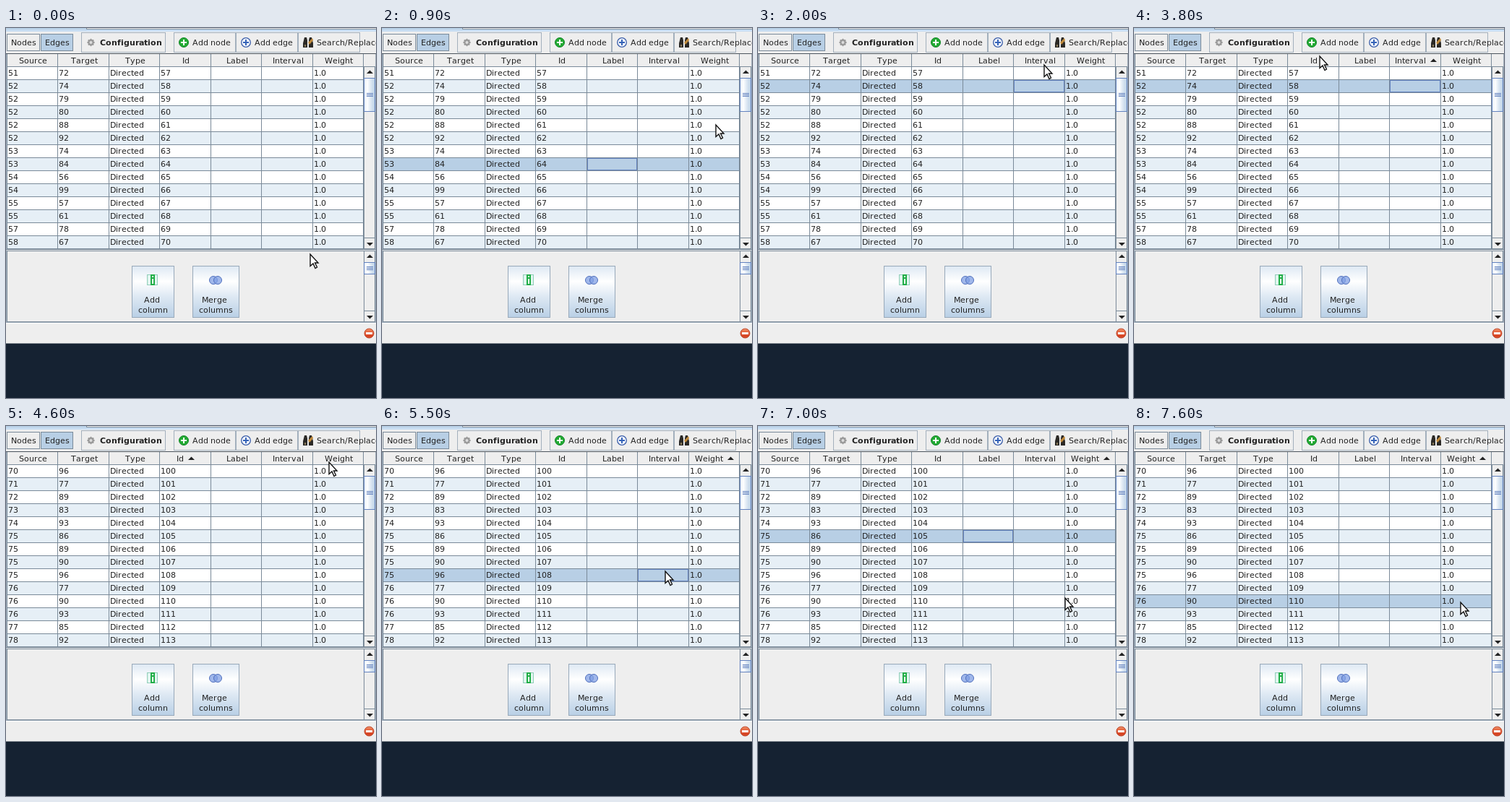
Write an HTML page with a canvas that moves like this. It is 512 px wide and 512 px high and loops after 8000 ms.

```html
<!DOCTYPE html>
<html lang="en">
<head>
<meta charset="utf-8">
<title>Edge table</title>
<style>
  html, body { margin: 0; width: 100%; height: 100%; overflow: hidden; background: #152232; }
  canvas { display: block; }
</style>
</head>
<body>
<canvas id="stage" width="512" height="512"></canvas>
<script>
const ctx = document.getElementById('stage').getContext('2d', { alpha: false });
const LOOP = 8000, STEP = 100;
const PANEL = '#eeeeee', EDGE = '#7a8a99', SOFT = '#a3b0bd', PICK = '#b8cfe5', BLUE = '#6382bf', INK = '#222222';
const FONT = '11px "DejaVu Sans", sans-serif';

const HEADS = ['Source', 'Target', 'Type', 'Id', 'Label', 'Interval', 'Weight'];
const ID = 3, WEIGHT = 6;
const ROW_TOP = 53, ROW_H = 18;
const colX = i => Math.round(1 + i * 70.43);

// Edges listed as source:targets, with ids counting up
function edges(list, id) {
  return list.split(' ').flatMap(group => {
    const [from, targets] = group.split(':');
    return targets.split(',').map(to => [from, to, 'Directed', String(id++), '', '', '1.0']);
  });
}
const unsorted = edges('51:72 52:74,79,80,88,92 53:74,84 54:56,99 55:57,61 57:78 58:67', 57);
const sortedById = edges('70:96 71:77 72:89 73:83 74:93 75:86,89,90,96 76:77,90,93 77:85 78:92', 100);

// Pointer moves: when, for how long, to where, and when it then clicks
const START = { x: 421, y: 313 };
const MOVES = [
  { at: 0, span: 300, x: 328, y: 193, click: 500 },
  { at: 500, span: 400, x: 462, y: 134, click: 1000 },
  { at: 1100, span: 500, x: 400, y: 82, click: 1600 },
  { at: 1600, span: 400, x: 396, y: 51 },
  { at: 2000, span: 300, x: 398, y: 46, click: 2300 },
  { at: 2800, span: 200, x: 447, y: 46 },
  { at: 3100, span: 700, x: 257, y: 39, click: 4000 },
  { at: 4100, span: 500, x: 447, y: 50, click: 5000 },
  { at: 5000, span: 400, x: 392, y: 201, click: 5500 },
  { at: 5600, span: 400, x: 304, y: 144, click: 6200 },
  { at: 6400, span: 400, x: 425, y: 238 },
  { at: 7100, span: 200, x: 442, y: 257 },
  { at: 7300, span: 200, x: 452, y: 244, click: 7600 }
];

// A click on the header sorts; a click below it selects a cell.
function stateAt(t) {
  const s = { ...START, rows: unsorted, sort: -1, row: -1, col: -1 };
  for (const m of MOVES) {
    const k = Math.min(1, Math.max(0, (t - m.at) / m.span));
    s.x = Math.round(s.x + (m.x - s.x) * k);
    s.y = Math.round(s.y + (m.y - s.y) * k);
    if (!(t >= m.click)) continue;
    const col = HEADS.findIndex((_, i) => m.x < colX(i + 1));
    if (m.y >= ROW_TOP) {
      s.row = Math.floor((m.y - ROW_TOP) / ROW_H);
      s.col = col;
    } else {
      s.sort = col;
      if (col === ID) Object.assign(s, { rows: sortedById, row: -1 });
    }
  }
  return s;
}

function rect(x, y, w, h, fill) {
  ctx.fillStyle = fill;
  ctx.fillRect(x, y, w, h);
}

function frame(x, y, w, h, color, fill) {
  if (fill) rect(x, y, w, h, fill);
  ctx.strokeStyle = color;
  ctx.lineWidth = 1;
  ctx.strokeRect(x + 0.5, y + 0.5, w - 1, h - 1);
}

// Letters advance by whole pixels, as in a hinted desktop interface.
const advance = c => Math.round(ctx.measureText(c).width);

function text(s, x, y, font = FONT) {
  ctx.font = font;
  ctx.fillStyle = INK;
  for (const c of s) {
    ctx.fillText(c, x, y);
    x += advance(c);
  }
}

function centered(s, cx, y) {
  ctx.font = FONT;
  const w = [...s].reduce((sum, c) => sum + advance(c), 0);
  text(s, Math.floor(cx - w / 2), y);
  return w;
}

function paint(fill, stroke, width = 1) {
  ctx.fillStyle = fill;
  ctx.fill();
  if (!stroke) return;
  ctx.strokeStyle = stroke;
  ctx.lineWidth = width;
  ctx.stroke();
}

function shape(points, ...style) {
  ctx.beginPath();
  points.forEach(([x, y]) => ctx.lineTo(x, y));
  ctx.closePath();
  paint(...style);
}

function disc(x, y, r, ...style) {
  ctx.beginPath();
  ctx.arc(x, y, r, 0, Math.PI * 2);
  paint(...style);
}

function plus(x, y, r, color) {
  rect(x - r, y - 1, 2 * r, 2, color);
  rect(x - 1, y - r, 2, 2 * r, color);
}

function gradient(x0, y0, x1, y1, stops) {
  const g = ctx.createLinearGradient(x0, y0, x1, y1);
  stops.forEach(s => g.addColorStop(...s));
  return g;
}

const GLOSS = [[0, '#dde8f3'], [0.3, '#ffffff'], [0.6, '#dde8f3'], [1, PICK]];

function arrow(cx, y, dir, w = 4.5) {
  shape([[cx - w, y + 2 * dir], [cx + w, y + 2 * dir], [cx, y - 2.5 * dir]], INK);
}

function scrollBar(top, bottom, thumbH) {
  const x = 495, w = 16, y = top + 16;
  frame(x, top, w, bottom - top, EDGE, PANEL);
  frame(x, top, w, 17, EDGE, PANEL);
  frame(x, bottom - 16, w, 16, EDGE, PANEL);
  arrow(503.5, top + 8, 1);
  arrow(503.5, bottom - 7, -1);
  frame(x, y, w, thumbH, BLUE, gradient(x, 0, x + w, 0, GLOSS));
  for (let i = -1; i < 2; i++) rect(499, y + (thumbH >> 1) + i * 2, 9, 1, BLUE);
}

function binoculars(x, y) {
  for (const side of [-1, 1]) {
    const p = (dx, dy) => [x + side * dx, y + dy];
    shape([p(2, -7), p(5, -7), p(7, 1), p(7, 7), p(1, 7), p(1, -3)], '#2b2926');
  }
  rect(x - 5, y + 3, 2, 3, '#8a7a58');
  shape([[x, y], [x + 6, y - 6], [x + 7, y - 3], [x + 2, y + 3]], '#c08a3c');
}

function toolbar() {
  rect(0, 0, 111, 2, PICK);
  rect(111, 0, 1, 2, EDGE);
  rect(111, 1, 401, 1, EDGE);
  rect(0, 2, 512, 3, '#c8ddf2');
  frame(1, 8, 46, 24, EDGE);
  frame(48, 8, 45, 24, EDGE, PICK);
  text('Nodes', 7, 24);
  text('Edges', 54, 24);
  frame(104, 6, 117, 28, SOFT);
  text('Configuration', 130, 24, 'bold ' + FONT);
  ['Add node', 'Add edge', 'Search/Replace'].forEach((label, i) => {
    const x = 232 + 86 * i;
    frame(x, 6, 86, 28, SOFT);
    text(label, x + 26, 24);
  });

  for (let i = 0; i < 8; i++) {
    const a = i * Math.PI / 4;
    disc(117.5 + 4 * Math.cos(a), 20 + 4 * Math.sin(a), 1.2, '#999999');
  }
  disc(117.5, 20, 3, '#dddddd', '#999999', 2);
  disc(246, 20, 6.5, '#22aa33', '#15862a');
  plus(246, 20, 4, '#ffffff');
  disc(332, 20, 6.3, '#f4f8ff', '#3a5da8', 1.3);
  plus(332, 20, 4, '#3563b8');
  binoculars(418, 20);
}

function table({ rows, sort, row, col }) {
  rect(0, 35, 512, 1, '#4c555e');
  HEADS.forEach((name, i) => {
    const on = i === sort;
    const cx = (colX(i) + colX(i + 1)) / 2 + (on ? -6 : 2);
    const w = centered(name, cx, 49);
    if (on) arrow(Math.floor(cx + w / 2) + 10.5, 45, 1);
  });

  rows.forEach((cells, r) => {
    const y = ROW_TOP + r * ROW_H;
    rect(2, y + 1, 492, 17, r === row ? PICK : r % 2 ? '#e6eff6' : '#ffffff');
    rect(1, y + ROW_H, 494, 1, EDGE);
    cells.forEach((s, i) => text(s, colX(i) + 2, y + 13));
  });
  rect(1, ROW_TOP, 494, 1, EDGE);
  for (let i = 0; i < 8; i++) rect(colX(i), 36, 1, 270, EDGE);
  if (row >= 0 && col !== WEIGHT) {
    frame(colX(col) + 1, ROW_TOP + row * ROW_H + 1, colX(col + 1) - colX(col) - 1, 17, BLUE);
  }
  scrollBar(53, 306, 47);
  rect(0, 306, 512, 1, EDGE);
}

function bigButton(x, w, label) {
  frame(x, 329, w, 72, '#98a9ba', gradient(0, 329, 0, 401, GLOSS));
  centered(label + ' ', x + w / 2, 380);
  centered(label === 'Add' ? 'column' : 'columns', x + w / 2, 394);
}

function lowerPanel() {
  frame(1, 308, 510, 99, EDGE);
  scrollBar(308, 407, 17);
  bigButton(174, 59, 'Add');
  bigButton(258, 65, 'Merge');

  frame(195, 341, 15, 15, '#8fcdb8', '#e2f6f0');
  rect(200, 341, 6, 15, '#22ae48');
  rect(202, 343, 2, 2, '#ffffff');
  rect(202, 347, 2, 7, '#ffffff');

  for (const x of [287, 293]) disc(x, 349, 5.5, 'rgba(130,160,228,.75)', '#5070bd');
}

function statusBar() {
  rect(0, 408, 512, 1, '#ffffff');
  rect(0, 436, 512, 1, '#808890');
  disc(502.5, 422.5, 6.5, gradient(0, 416, 0, 429, [[0, '#f0956a'], [0.5, '#e0502c'], [1, '#d04022']]), '#c04a30');
  rect(498, 421, 9, 3, '#ffffff');
}

function pointer(x, y) {
  const outline = [[0, 0], [0, 16.5], [4, 13], [7, 19.5], [9.5, 18], [6.5, 12], [11, 12]];
  shape(outline.map(([dx, dy]) => [x + dx, y + dy]), '#ffffff', '#111111', 1.4);
}

function draw(now) {
  const state = stateAt(Math.floor(now % LOOP / STEP) * STEP);
  rect(0, 0, 512, 512, '#152232');
  rect(0, 0, 512, 436, PANEL);
  toolbar();
  frame(0, 35, 512, 373, SOFT);
  table(state);
  lowerPanel();
  statusBar();
  pointer(state.x, state.y);
}

let start;
function tick(now) {
  start ??= now;
  draw(now - start);
  requestAnimationFrame(tick);
}
draw(0);
requestAnimationFrame(tick);
</script>
</body>
</html>
```
